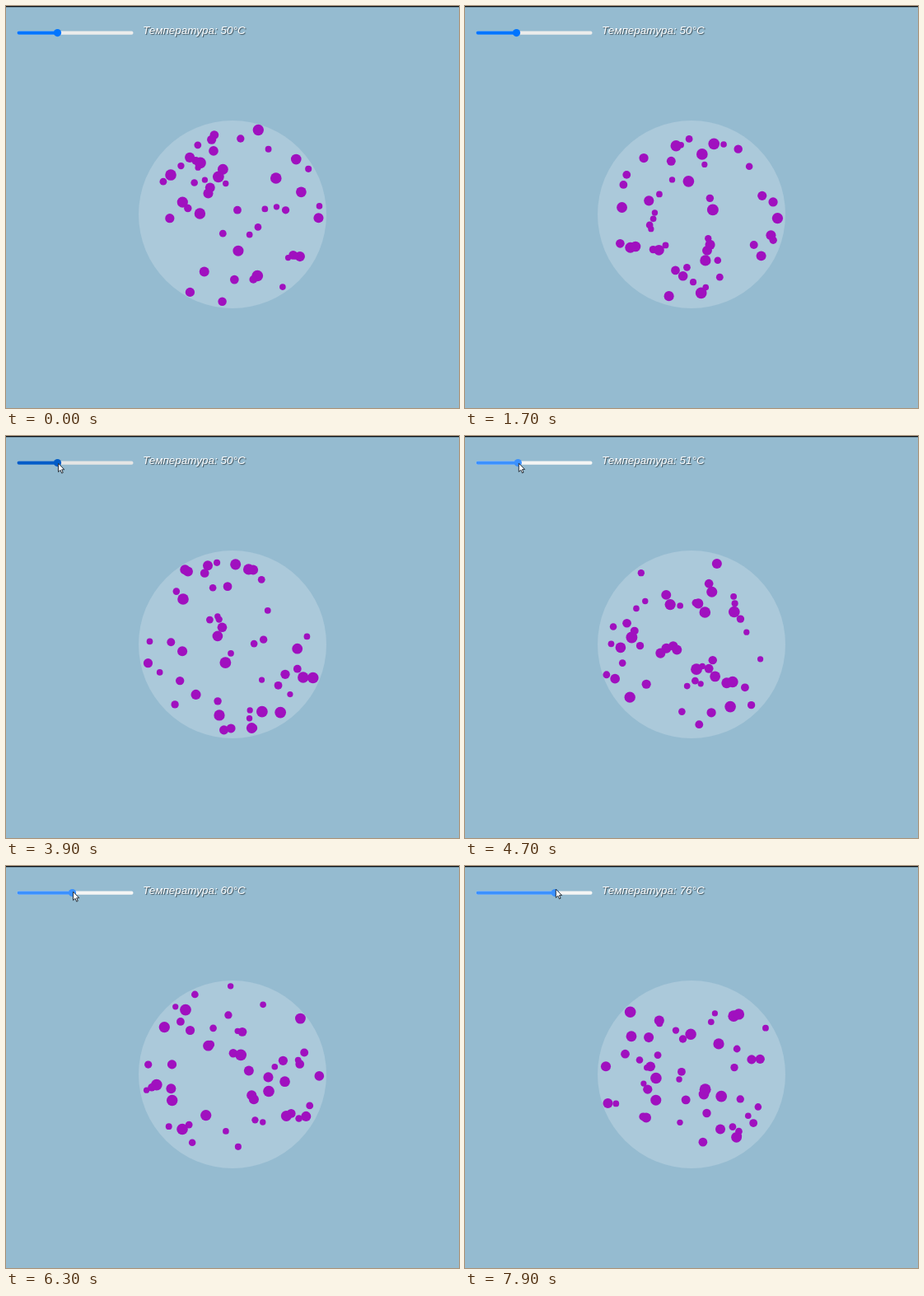
An HTML page with a canvas that plays this animation: 550 px wide and 488 px high, repeating every 8 s.

```html
<!DOCTYPE html>
<html lang="ru">
<head>
<meta charset="utf-8">
<style>
html, body { margin: 0; width: 100%; height: 100%; overflow: hidden; background: #95bbd0; }
canvas { display: block; }
#label {
  position: absolute; left: 166px; top: 22px; white-space: pre;
  font: italic 13.5px/16px "Liberation Sans", Arial, sans-serif;
  color: #fff; text-shadow: 1px 1px 1px #3c4c55;
}
</style>
</head>
<body>
<canvas id="stage" width="550" height="488"></canvas>
<div id="label"></div>
<script>
const ctx = document.getElementById('stage').getContext('2d');
const label = document.getElementById('label');
const LOOP = 8000, STEP = 100;
const CX = 275, CY = 253, RADIUS = 114, COUNT = 50;

// time, temperature
const heat = [[4600, 50], [4700, 51], [5000, 45], [5400, 53], [6300, 60], [7900, 76]];
// time, x, y of the pointer on its way to the slider
const approach = [[2400, -8, 92], [2700, 72, 88], [2900, 118, 120], [3100, 70, 95], [3500, 63, 33]];
const arrow = new Path2D('M0 0V10.5L2.5 8.2L4.2 12L5.8 11.2L4.2 7.6H7.4Z');

function tween(keys, t) {
  const next = keys.findIndex(k => k[0] > t);
  if (next === 0) return keys[0].slice(1);
  if (next < 0) return keys[keys.length - 1].slice(1);
  const a = keys[next - 1], b = keys[next];
  const f = (t - a[0]) / (b[0] - a[0]);
  return a.slice(1).map((v, j) => v + (b[j + 1] - v) * f);
}

const degreesAt = t => Math.round(tween(heat, t)[0]);
const thumbX = degrees => 62.5 + (degrees - 50) * 1.8;

let seed = 17;
function random() {
  seed = (seed * 16807) % 2147483647;
  return seed / 2147483647;
}

// A particle's path is a chord: its direction, distance from the centre and half length
function makeParticle() {
  const r = 3.6 + random() * 3.4;
  const bound = RADIUS - r;
  const distance = bound * Math.sqrt(random());
  const heading = random() * 2 * Math.PI;
  const offset = distance * Math.sin(heading);
  return {
    r, offset,
    angle: random() * 2 * Math.PI,
    speed: 70 + random() * 90,
    along: distance * Math.cos(heading),
    half: Math.sqrt(bound * bound - offset * offset)
  };
}
const particles = Array.from({ length: COUNT }, makeParticle);

function disc(x, y, r, color) {
  ctx.fillStyle = color;
  ctx.beginPath();
  ctx.arc(x, y, r, 0, 2 * Math.PI);
  ctx.fill();
}

// Elastic bounces in a circle: equal chords, each turned by the same angle
function drawParticle(p, time) {
  const q = p.along + p.half + p.speed * time;
  const bounces = Math.floor(q / (2 * p.half));
  const s = q - (2 * bounces + 1) * p.half;
  const turn = 2 * Math.atan2(p.offset, p.half) - Math.PI;
  const a = p.angle + bounces * turn;
  const c = Math.cos(a), n = Math.sin(a);
  disc(CX + c * s - n * p.offset, CY + n * s + c * p.offset, p.r, '#a010bf');
}

function bar(x, width, color) {
  ctx.fillStyle = color;
  ctx.beginPath();
  ctx.roundRect(x, 30.5, width, 4.2, 2);
  ctx.fill();
}

function drawSlider(t, degrees) {
  const pressed = t >= 4200 && t < 5500 || t >= 5900;
  const hovered = t >= 3500 && !pressed;
  const blue = pressed ? '#3b91ff' : hovered ? '#005cc8' : '#0075ff';
  const x = thumbX(degrees);
  bar(13.5, 141, pressed ? '#f5f5f5' : hovered ? '#e5e5e5' : '#ececec');
  bar(13.5, x - 13.5, blue);
  disc(x, 32.6, 4.6, blue);
}

function drawPointer(t, degrees) {
  if (t < approach[0][0]) return;
  const [x, y] = t < 3500 ? tween(approach, t) : [thumbX(degrees) + 1, 33 - (degrees - 51) / 5];
  ctx.save();
  ctx.translate(x, y);
  ctx.fillStyle = '#fff';
  ctx.strokeStyle = '#28323c';
  ctx.fill(arrow);
  ctx.stroke(arrow);
  ctx.restore();
}

function draw(t) {
  ctx.fillStyle = '#95bbd0';
  ctx.fillRect(0, 0, 550, 488);
  ctx.fillStyle = '#0c1014';
  ctx.fillRect(0, 0, 550, 1.3);
  disc(CX, CY, RADIUS, '#abc9da');

  // Speed grows with temperature
  let time = 0;
  for (let k = 0; k < t; k += STEP) time += degreesAt(k) / 50 * STEP / 1000;
  particles.forEach(p => drawParticle(p, time));

  const degrees = degreesAt(t);
  drawSlider(t, degrees);
  drawPointer(t, degrees);
  label.textContent = `Температура: ${degrees}°C`;
}

const begin = performance.now();
function frame() {
  const t = (performance.now() - begin) % LOOP;
  draw(Math.floor(t / STEP) * STEP);
  requestAnimationFrame(frame);
}
frame();
</script>
</body>
</html>
```
